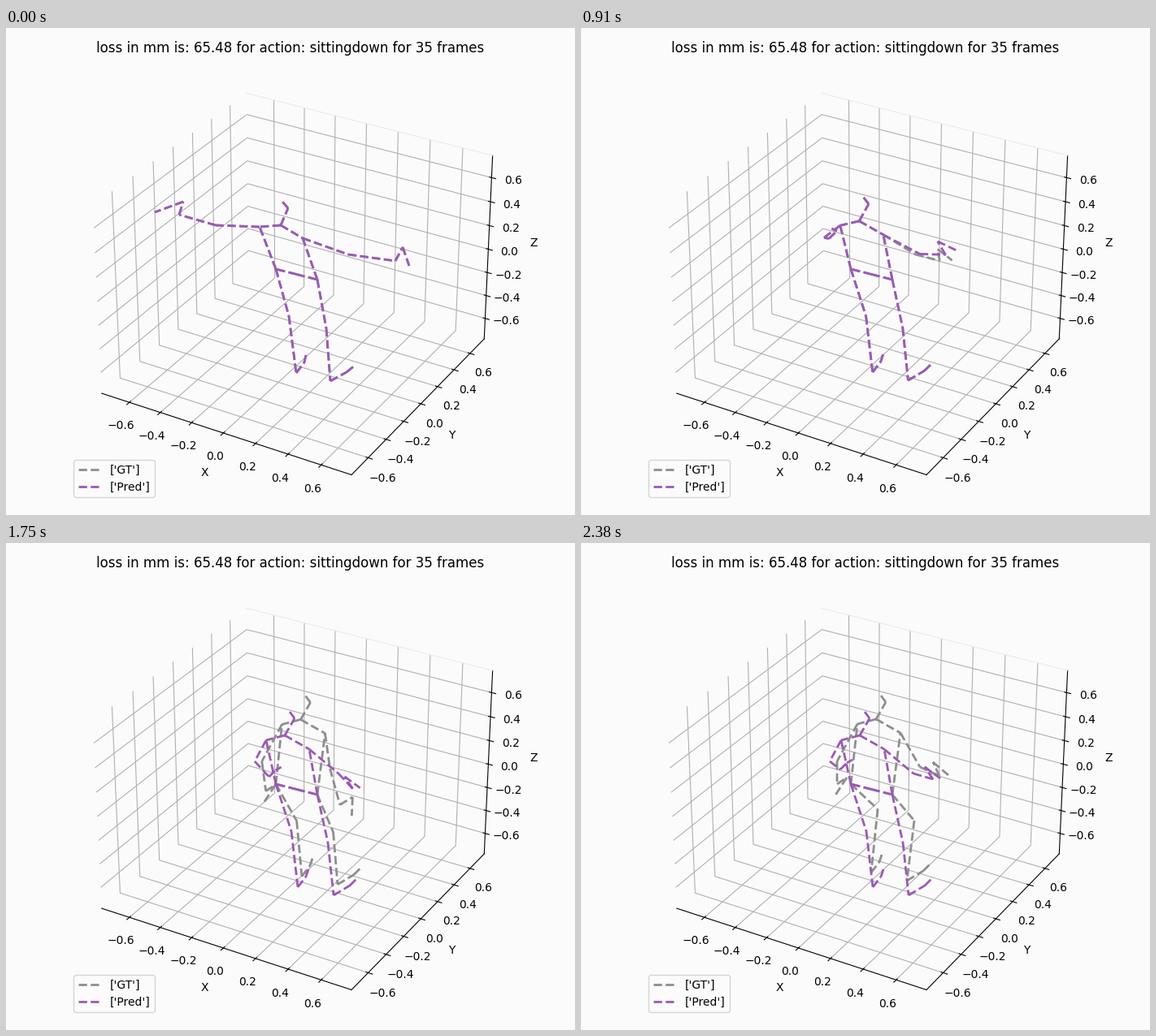
A matplotlib script for the animation above (2.45 s loop, 700 by 600 pixels).

```python
import numpy as np
import matplotlib.pyplot as plt
from matplotlib.animation import FuncAnimation
from matplotlib.lines import Line2D

W, H, DPI = 700, 600, 100
FRAMES, INTERVAL = 35, 70
BACK = "#fbfbfb"
GREY, PURPLE = "#8e8e8e", "#9b59b6"
LIM = 0.78125
PARTS = {"leg": ("hip", "knee", "ankle", "foot", "toe"),
         "arm": ("shoulder", "elbow", "wrist", "palm", "tip")}

# Slow joints: start on screen and total drift.
BODY = {
    "root": ((357.5, 303.5), (0, 0)), "hip_a": ((332, 297), (0, 0)), "hip_b": ((383, 310), (0, 0)),
    "neck": ((338, 243), (5, -6)), "face": ((347, 222), (8, -6)), "crown": ((340, 214), (9, -6)),
    "shoulder_a": ((312, 245), (8, -2)), "shoulder_b": ((365, 259), (8, -5)),
    "knee_a": ((348, 355), (3, 0)), "knee_b": ((394, 370), (2, -1)),
    "ankle_a": ((357, 425), (2, -1)), "ankle_b": ((399, 435), (4, -1)),
    "foot_a": ((367, 412), (2, -1)), "foot_b": ((419, 424), (4, -2)),
    "toe_a": ((369, 403), (3, -1)), "toe_b": ((430, 415), (2, -2)),
}

# Arm joints sweep down along arcs: start, control point, end.
ARCS = {
    "elbow_a": ((258, 243), (281, 227), (306, 269)),
    "wrist_a": ((213, 230), (264, 190), (319, 279)),
    "palm_a": ((218, 214), (280, 177), (327, 271)),
    "tip_a": ((183, 227), (234, 176), (334, 267)),
    "elbow_b": ((421, 279), (441, 261), (409, 284)),
    "wrist_b": ((479, 287), (502, 228), (433, 291)),
    "palm_b": ((488, 270), (491, 207), (423, 276)),
    "tip_b": ((496, 293), (532, 210), (442, 290)),
}

# How the true pose leaves the prediction: a lasting rise and a passing dip.
RISE = {"elbow_a": (9, 0), "wrist_a": (-4, 18), "palm_a": (0, 18), "tip_a": (-22, 45),
        "elbow_b": (8, -8), "wrist_b": (8, -4), "palm_b": (10, -6), "tip_b": (10, -4)}
DIP = {"elbow_b": (-20, 2), "wrist_b": (-26, 26), "palm_b": (0, 34), "tip_b": (-22, 42)}


def ramp(start, length):
    """Column of 0..1 progress, one row per frame."""
    t = np.arange(FRAMES)[:, None]
    return np.clip((t - start) / length, 0, 1)


def smooth(u):
    return u * u * (3 - 2 * u)


sweep = smooth(ramp(0, 17))
dip = np.sin(np.pi * ramp(11, 22))
rise = np.sin(np.pi / 2 * ramp(13, 14))
lift = ramp(17, 17)
step = smooth(ramp(17, 12))
kick = np.sin(np.pi * lift**2)


def predicted():
    joints = {name: np.array(start) + sweep * drift for name, (start, drift) in BODY.items()}
    for name, (p, c, q) in ARCS.items():
        p, c, q = map(np.array, (p, c, q))
        joints[name] = (1 - sweep) ** 2 * p + 2 * sweep * (1 - sweep) * c + sweep**2 * q
        if not name.startswith("elbow"):
            joints[name] = joints[name] + dip * ((5, 10) if name.endswith("a") else (-7, 13))
    return joints


def offset(name):
    """Distance of the true joint from the predicted one."""
    part = name.split("_")[0]
    if part in ("root", "hip"):
        return 0
    if part == "knee":
        return lift * (14, -27)
    if part in PARTS["leg"]:
        return step * (-2, -18) + kick * (10, 0)
    return rise * RISE.get(name, (20, -20)) + dip * DIP.get(name, (0, 0))


def chain(*names):
    return list(zip(names, names[1:]))


BONES = chain("neck", "face", "crown")
for side in ("_a", "_b"):
    leg, arm = ([part + side for part in PARTS[limb]] for limb in ("leg", "arm"))
    BONES += chain("root", *leg) + chain("neck", *arm) + [(leg[0], arm[0])]


def bone_line(joints, k):
    """All bones as one polyline, broken by gaps."""
    gap = (np.nan, np.nan)
    return np.array([q for a, b in BONES for q in (joints[a][k], joints[b][k], gap)]).T


fig = plt.figure(figsize=(W / DPI, H / DPI), dpi=DPI, facecolor=BACK)

size = 547
ax = fig.add_axes([(W - size) / 2 / W, 15 / H, size / W, size / H],
                  projection="3d", facecolor=BACK)
ax.view_init(elev=30, azim=-60)
ax.plot([-LIM, LIM], [LIM, LIM], [LIM, LIM], color="#ebebeb", lw=0.8)
ax.set(xlim=(-LIM, LIM), ylim=(-LIM, LIM), zlim=(-LIM, LIM),
       xlabel="X", ylabel="Y", zlabel="Z")
for axis in (ax.xaxis, ax.yaxis, ax.zaxis):
    axis.set_ticks(np.arange(-3, 4) / 5)
    axis.set_pane_color((1, 1, 1, 0))
# 3D axes lower a title given through set_title, so fill the text directly.
ax.title.set_text("loss in mm is: 65.48 for action: sittingdown for 35 frames")

style = dict(lw=2, ls="--")
ax.legend(handles=[Line2D([], [], color=GREY, label="['GT']", **style),
                   Line2D([], [], color=PURPLE, label="['Pred']", **style)],
          loc="lower left", facecolor=BACK)

# Pixel-aligned layer for the two skeletons.
stage = fig.add_axes([0, 0, 1, 1])
stage.set(xlim=(0, W), ylim=(H, 0))
stage.axis("off")
pred = predicted()
true = {name: path + offset(name) for name, path in pred.items()}
skeletons = [(stage.plot([], [], color=color, **style)[0], joints)
             for color, joints in ((GREY, true), (PURPLE, pred))]


def update(k):
    for line, joints in skeletons:
        line.set_data(*bone_line(joints, k))
    return [line for line, _ in skeletons]


anim = FuncAnimation(fig, update, frames=FRAMES, interval=INTERVAL, repeat=True,
                     repeat_delay=0, blit=False)
plt.show()
```
